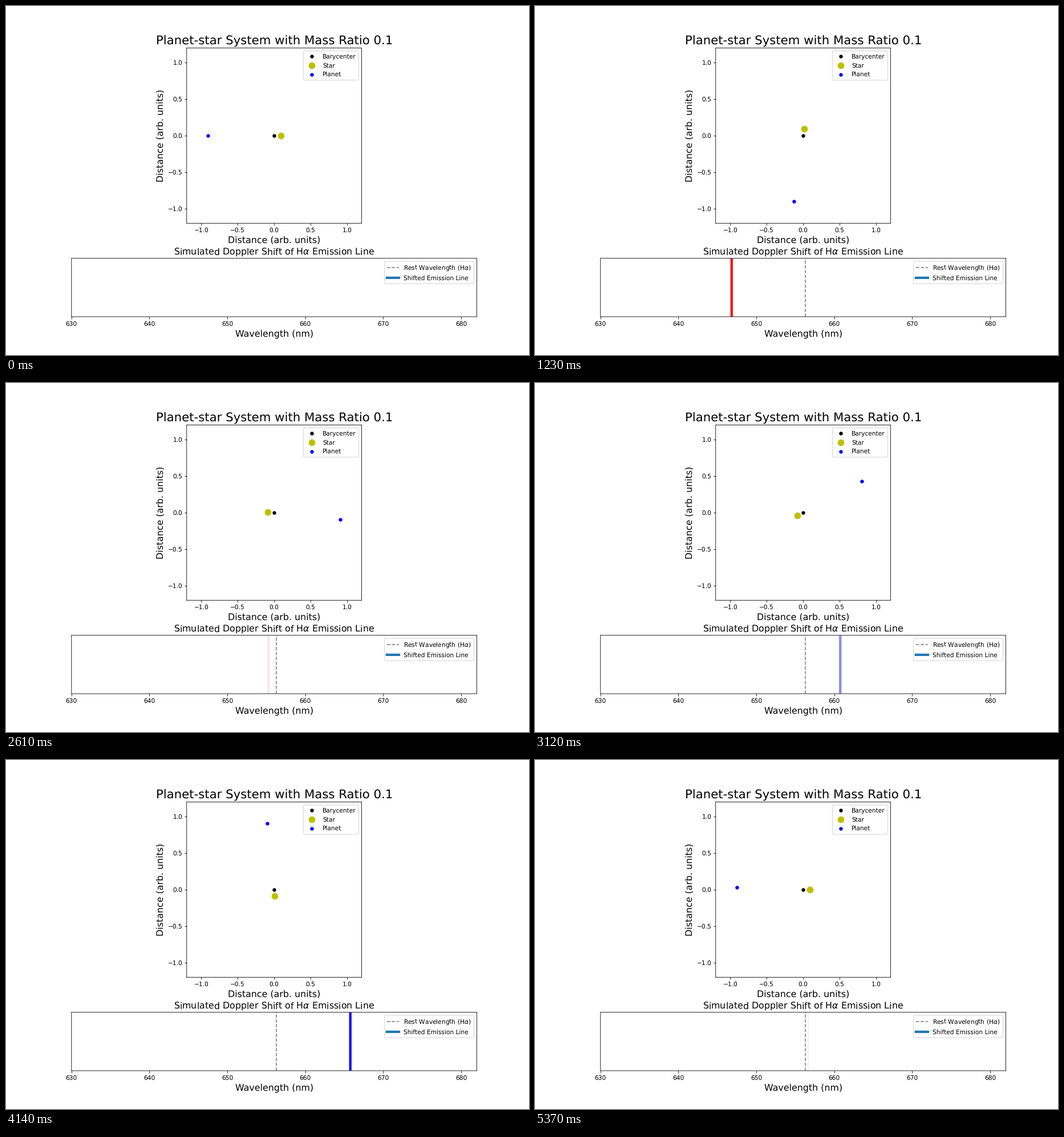
Write a matplotlib script that moves like this. It is 917 px wide and 611 px high and loops after 5400 ms.

```python
import numpy as np
import matplotlib.pyplot as plt
from matplotlib.animation import FuncAnimation

WIDTH, HEIGHT, DPI = 917, 611, 76.375
FRAMES, INTERVAL = 180, 30

MASS_RATIO = 0.1
R_PLANET = 1 / (1 + MASS_RATIO)
R_STAR = MASS_RATIO * R_PLANET
REST = 656.28                      # H-alpha, nm
SHIFT = REST * 0.16 * R_STAR       # largest shift, nm

# Unhinted text and unsnapped lines keep sub-pixel placement.
plt.rcParams.update({
    "font.family": "DejaVu Sans",
    "text.hinting": "none",
    "path.snap": False,
})

eps = 1e-3  # guards against the pixel size being truncated
dx, dy = 0.2 / WIDTH, 0.2 / HEIGHT
fig, (orbit, spectrum) = plt.subplots(
    2, 1,
    figsize=((WIDTH + eps) / DPI, (HEIGHT + eps) / DPI), dpi=DPI,
    gridspec_kw=dict(height_ratios=[3, 1], hspace=0.3,
                     left=0.125 + dx, right=0.9 + dx,
                     bottom=0.11 - dy, top=0.88 - dy),
)


def dot(color, size, label):
    return orbit.scatter([0], [0], s=size ** 2, c=color, linewidths=1, label=label)


dot("k", 5, "Barycenter")
star = dot("y", 10, "Star")
planet = dot("b", 5, "Planet")
orbit.set(xlim=(-1.2, 1.2), ylim=(-1.2, 1.2), aspect="equal")
orbit.set_title(f"Planet-star System with Mass Ratio {MASS_RATIO}", fontsize=20)
orbit.set_xlabel("Distance (arb. units)", fontsize=15)
orbit.set_ylabel("Distance (arb. units)", fontsize=15)
orbit.legend(loc="upper right", scatteryoffsets=[0.5])

rest_line, = spectrum.plot([], [], "--", color="gray",
                           label=r"Rest Wavelength (H$\alpha$)")
shifted_line, = spectrum.plot([], [], lw=4, label="Shifted Emission Line")
spectrum.set(xlim=(630, 682), ylim=(0, 1), yticks=[])
spectrum.set_title(r"Simulated Doppler Shift of H$\alpha$ Emission Line", fontsize=15)
spectrum.set_xlabel("Wavelength (nm)", fontsize=15)
spectrum.legend(loc="upper right")


def shift_color(s):
    """White at rest, red for positive s, blue for negative s."""
    fade = 1 - abs(s)
    return (1, fade, fade) if s > 0 else (fade, fade, 1)


def update(i):
    angle = 2 * np.pi * i / FRAMES
    c, s = np.cos(angle), np.sin(angle)
    star.set_offsets([[R_STAR * c, R_STAR * s]])
    planet.set_offsets([[-R_PLANET * c, -R_PLANET * s]])

    # The spectrum starts out empty.
    if i == 0:
        rest_line.set_data([], [])
        shifted_line.set_data([], [])
    else:
        x = REST - SHIFT * s
        rest_line.set_data([REST, REST], [0, 1])
        shifted_line.set_data([x, x], [0, 1])
        shifted_line.set_color(shift_color(s))
    return star, planet, rest_line, shifted_line


anim = FuncAnimation(fig, update, frames=FRAMES, interval=INTERVAL,
                     init_func=lambda: update(0), repeat=True, repeat_delay=0)
plt.show()
```
